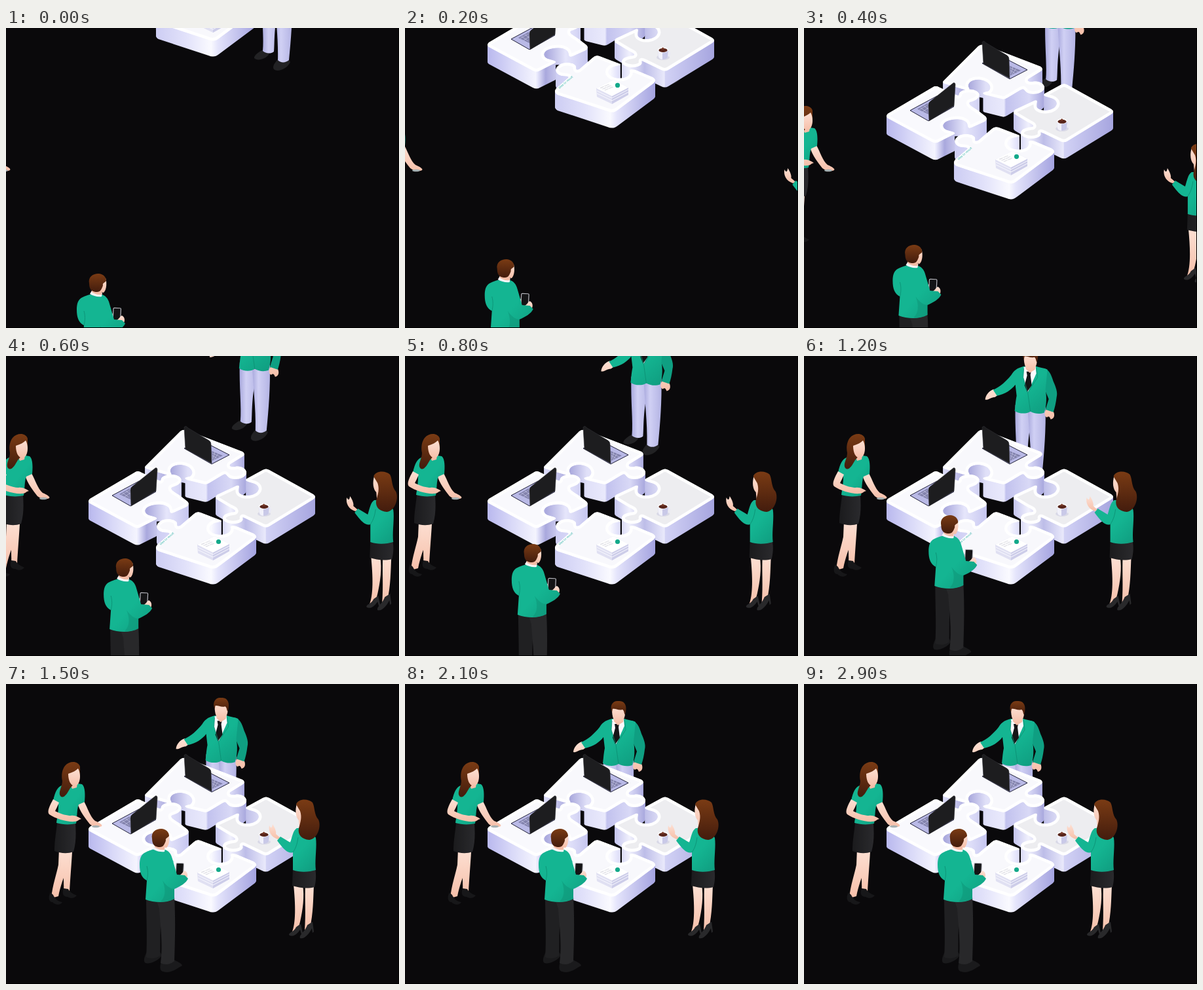
Recreate the animation shown at these times as an HTML page. Size 600x458 px, loop 3000 ms.

```html
<!DOCTYPE html>
<html lang="en">
<head>
<meta charset="utf-8">
<title>Team around a puzzle table</title>
<style>
html,body{margin:0;width:100%;height:100%;overflow:hidden;background:#0a090b}
svg{display:block;width:100vw;height:100vh}
text{font-family:"Open Sans",Arial,sans-serif}
</style>
</head>
<body>
<svg viewBox="0 0 600 458" preserveAspectRatio="none">
<defs id="defs">
<linearGradient id="green" x1="0" y1="0" x2="1" y2="1"><stop offset=".55" stop-color="#14b592"/><stop offset="1" stop-color="#0f9c7f"/></linearGradient>
<linearGradient id="skin" x1="0" y1="0" x2="0" y2="1"><stop offset="0" stop-color="#fde0d3"/><stop offset="1" stop-color="#f6bfa9"/></linearGradient>
<linearGradient id="hair" x1="0" y1="0" x2="0" y2="1"><stop offset="0" stop-color="#7a3b14"/><stop offset="1" stop-color="#431c0d"/></linearGradient>
<linearGradient id="leg"><stop offset="0" stop-color="#a9a9dd"/><stop offset=".35" stop-color="#d0d0f4"/><stop offset="1" stop-color="#b4b4e4"/></linearGradient>
<linearGradient id="cloth"><stop offset="0" stop-color="#1b1b1d"/><stop offset="1" stop-color="#2a2a2d"/></linearGradient>
</defs>
<rect width="600" height="458" fill="#0a090b"/>

<g id="host">
  <g fill="#222224">
    <path d="M305 200C298 203 290 209 291 213C295 218 309 215 314 206Z"/>
    <path d="M328 214C322 220 318 226 321 230C326 235 341 230 346 219L343 214Z"/>
  </g>
  <path fill="url(#leg)" d="M303 112H331L325 150C321 175 322 195 321 203C316 207 308 206 304 202C306 180 302 150 303 112Z"/>
  <path fill="url(#leg)" d="M322 112H349C350 150 347 185 344 216C338 221 331 220 327 216C328 180 323 150 322 112Z"/>
  <path fill="url(#skin)" d="M270 88C263 90 257 98 257 104C262 105 266 100 272 100L279 95ZM350 119C347 124 347 129 351 131C354 129 355 129 357 134C363 133 364 126 360 120Z"/>
  <path fill="#0f9f82" d="M345 56C354 56 358 66 361 76C365 85 368 93 366 100C365 109 363 117 361 123L349 119L354 103L346 84Z"/>
  <path fill="url(#green)" d="M316 53C304 56 301 60 297 66C289 76 280 84 269 89L275 98C288 95 297 89 303 81L305 98C303 108 303 115 302 121C309 126 320 126 326 122C333 126 341 126 347 124C351 112 351 100 349 88L352 58C346 55 340 55 335 53Z"/>
  <path fill="#fafafe" d="M316 54L334 53L335 64L322 93L315 70Z"/>
  <path fill="#151517" d="M320 61H327L326 66L328 82L321 92L317 82L321 67Z"/>
  <path d="M316 56L315 70L322 93L326 122M335 55L337 70L322 93" fill="none" stroke="#0c8d72" stroke-width=".8"/>
  <path fill="#f5bda7" d="M319 50H334L333 58L325 63L319 57Z"/>
  <path fill="url(#skin)" d="M316 39C316 33 334 34 336 40C337 50 333 59 326 60C319 60 316 50 316 39Z"/>
  <path fill="url(#hair)" d="M316 43C312 33 317 25 326 26C336 25 340 34 336 47C334 44 335 41 332 39C326 41 321 37 317 38Z"/>
</g>

<g id="table"></g>

<g id="left">
  <path fill="url(#skin)" d="M81 252H101C102 268 87 290 80 324L69 327C71 307 77 291 80 276ZM89 256H101C100 275 98 297 97 318L88 317C89 300 86 284 89 256Z"/>
  <path fill="#171719" d="M68 318C64 325 65 333 71 333C76 338 83 338 86 333C79 332 75 328 72 322ZM88 312C85 319 87 325 94 325C99 328 105 327 108 323C101 320 97 317 95 313Z"/>
  <path fill="url(#cloth)" d="M78 212L106 213C107 229 107 243 103 256C93 260 82 258 74 255C74 238 77 225 78 212Z"/>
  <path fill="url(#skin)" d="M109 182L119 179C125 190 128 202 136 209C143 212 148 215 146 217C140 220 133 218 128 214C121 205 113 195 109 182Z"/>
  <ellipse cx="137" cy="217.500" rx="6" ry="1.800" fill="#a7b1b3"/>
  <path fill="url(#green)" d="M85 155C79 157 75 164 72 178L80 184C80 196 78 205 77 212C87 215 98 215 107 213C109 202 108 191 111 184L120 180C121 169 121 157 116 153L103 151Z"/>
  <path fill="url(#skin)" d="M72 176L81 181C78 188 76 192 75 194C85 199 93 201 99 201C106 200 112 204 115 206C110 207 110 210 105 210C94 211 76 206 66 199C62 195 67 185 72 176Z"/>
  <path fill="#f5bea8" d="M97 150L109 151L108 158L101 160Z"/>
  <path fill="url(#hair)" d="M90 125C97 117 110 117 113 126L113 142L98 159C93 168 88 176 83 171C79 165 86 157 86 148C84 139 86 130 90 125Z"/>
  <path fill="url(#skin)" d="M95 137C102 135 107 132 110 129C115 137 114 153 106 156C98 156 95 146 95 137Z"/>
</g>

<g id="right">
  <path fill="url(#skin)" d="M439 306H453C456 325 453 345 449 363L445 378L436 381C443 365 442 337 439 306ZM457 306H470C469 330 469 350 464 373L456 376C458 350 456 330 457 306Z"/>
  <path fill="#29292b" d="M443 371L450 366L453 380L451 382L449 375C444 383 437 387 432 383C432 379 439 379 443 371ZM460 368L468 363L470 378L468 380L467 373C463 381 456 390 449 388C447 383 456 379 460 368Z"/>
  <path fill="url(#cloth)" d="M438 282H472C474 292 473 302 471 310C460 313 447 311 437 308Z"/>
  <path fill="url(#skin)" d="M415 237C405 234 400 225 402 216C404 220 406 221 407 214C411 220 413 226 412 229L419 235Z"/>
  <path fill="url(#green)" d="M444 220C438 224 437 233 434 242L419 233L414 239C422 250 430 260 438 257L438 284C449 288 463 287 473 284C471 269 475 249 473 235C469 225 458 219 444 220Z"/>
  <path d="M438 257C443 250 445 242 446 234" fill="none" stroke="#0c8d72" stroke-width=".8"/>
  <path fill="url(#skin)" d="M444 183C441 193 442 203 447 208L448 219H458V183Z"/>
  <path fill="url(#hair)" d="M443 184C445 175 461 174 468 181C472 189 470 199 477 207C482 218 475 237 463 238C452 237 445 231 447 220C450 210 452 203 449 194Z"/>
</g>

<g id="front">
  <path fill="#1a1a1c" d="M216 407C211 416 209 424 213 426C220 428 234 422 238 414L234 407ZM239 421C234 429 234 438 240 439C250 443 260 435 269 430C268 425 260 424 255 420Z"/>
  <path fill="#202022" d="M214 325H241L236 370C235 387 236 402 235 415C228 420 220 419 214 417C216 390 214 355 214 325Z"/>
  <path fill="#28282a" d="M228 325H257C259 359 258 393 257 423C250 429 242 429 236 426C240 395 235 365 234 343Z"/>
  <path fill="url(#skin)" d="M258 283C261 277 266 280 269 274L271 280C268 286 264 287 260 289Z"/>
  <rect x="259.500" y="273.500" width="11.500" height="22" rx="1.500" fill="#141416" stroke="#b9b9c0" stroke-width="1.200" transform="rotate(3 265 284)"/>
  <path fill="url(#skin)" d="M265 292C270 289 270 286 273 285C277 287 278 292 276 296L270 300Z"/>
  <path fill="url(#green)" d="M213 257C222 252 232 251 238 252C248 253 252 259 254 267L261 291L273 292L278 297C275 304 266 309 257 313L257 328C245 335 226 334 213 329L215 300C207 296 204 288 204 276C204 267 206 260 213 257Z"/>
  <path fill="#0e9679" opacity=".55" d="M239 300C245 309 252 313 257 313L257 328C250 332 242 332 236 332C244 325 244 312 239 300Z"/>
  <path d="M215 300C217 292 217 285 215 278" fill="none" stroke="#0c8d72" stroke-width=".8"/>
  <path fill="#f5f5f8" d="M224 252L227 247L243 250L242 256C236 257 229 255 224 252Z"/>
  <path fill="#f4bca6" d="M227 242H243L242 253C236 254 231 252 227 249Z"/>
  <path fill="url(#skin)" d="M239 228H248C250 233 250 246 245 250C240 250 238 244 239 228Z"/>
  <path fill="url(#hair)" d="M223 236C221 226 229 221 237 221C244 221 249 226 249 232C247 235 243 235 244 239C242 245 240 249 235 249C229 249 223 247 223 236Z"/>
</g>
<path d="M0 457.500H600M599.500 0V458" stroke="#000"/>
</svg>
<script>
const $ = id => document.getElementById(id);

// Top outline, wall height, top fill, x range and wall colours of each table piece
const pieces = [
  {
    d: 'M213 168L266 115Q271 111 278 114L361 146Q366 149 362 153L344 164C338 168 344 170 350 169C358 167 368 172 367 179C365 188 348 190 341 186C335 182 337 178 330 182L310 194Q306 197 300 195L276 189C270 186 276 185 281 184C288 180 285 168 268 166C254 165 248 173 252 179C254 183 250 184 244 181L214 172Q211 170 213 168Z',
    h: 27, top: '#f8f8fc', x: [213, 367],
    walls: [0, '#dcdcf8', .25, '#a9a8dc', .42, '#e0e0f8', .6, '#e9e9fc', .62, '#c2c2ee', .85, '#d9d9f6', 1, '#a7a6dd']
  },
  {
    d: 'M128 218L196 178Q201 174 207 178L229 188C238 192 236 190 237 187C240 180 262 178 267 187C270 193 262 198 254 200C248 203 258 208 264 212L277 222Q281 226 276 230L256 239C248 242 252 236 248 231C240 223 214 226 212 236C212 243 222 244 228 246C232 248 230 249 226 251L206 261Q201 264 195 261L128 225Q124 222 128 218Z',
    h: 26, top: '#f9f9fd', x: [126, 279],
    walls: [0, '#b9b8ee', .25, '#dadaf8', .48, '#f4f4fe', .5, '#e6e6fb', .58, '#a9a8dd', .78, '#e6e6fb', .84, '#dedef8', 1, '#c6c6f0']
  },
  {
    d: 'M322 212L352 198C360 196 352 204 356 209C362 216 384 214 386 203C386 195 376 194 370 192C364 190 366 188 370 186L392 174Q397 171 402 174L469 211Q475 215 469 219L402 260Q397 263 391 260L366 248C358 244 363 248 361 251C356 259 332 257 331 248C331 240 343 239 349 238C353 236 346 233 342 231L322 219Q318 216 322 212Z',
    h: 25, top: '#ededf0', x: [320, 472],
    walls: [0, '#c4c4ee', .15, '#f1f1fd', .3, '#bdbde8', .5, '#e9e9fb', .51, '#d2d2f5', 1, '#a6a5df']
  },
  {
    d: 'M231 288L247 274C254 269 246 270 241 269C230 268 226 258 236 252C244 247 256 249 260 253C263 256 258 262 266 259L287 241Q291 237 297 239L326 250C332 252 328 253 322 254C308 257 306 268 320 272C334 275 345 270 343 262C342 258 350 259 354 261L378 271Q385 275 380 280L325 321Q318 327 309 323L233 298Q226 294 231 288Z',
    h: 24, top: '#f8f8fc', x: [229, 382],
    walls: [0, '#cdcdf3', .3, '#e2e2fa', .55, '#fafaff', .62, '#e4e4fb', 1, '#a4a3e0']
  }
];

const laptopBack = `
  <path d="M272 141L314 165L341 151L304 132Z" fill="#b9b9e6" stroke="#23233c"/>
  <path d="M314 145L331 152L315 160Z" fill="#8282ac"/>
  <path d="M315 148L327 154M315 152L322 156M319 146L316 157M324 149L317 159" stroke="#d0d0f0" stroke-width=".6"/>
  <path d="M272 109Q274 105 278 110L310 129Q313 131 313 135L314 164L274 142Z" fill="#1d1d1f" stroke="#303035" stroke-width=".6"/>`;
const laptopLeft = `
  <path d="M162 213L190 229L229 207L203 191Z" fill="#b9b9e6" stroke="#23233c"/>
  <path d="M173 211L189 202L190 219Z" fill="#8282ac"/>
  <path d="M176 212L188 205M181 215L190 209M178 209L188 216M183 206L190 211" stroke="#d0d0f0" stroke-width=".6"/>
  <path d="M190 205Q190 201 193 199L228 171Q231 170 231 174L229 206L191 229Z" fill="#1d1d1f" stroke="#303035" stroke-width=".6"/>`;
const cup = `
  <ellipse cx="394" cy="241" rx="10" ry="4" fill="#d9d9e6"/>
  <path d="M401 232C406 231 405 239 400 239" fill="none" stroke="#e9e9f6" stroke-width="1.500"/>
  <path d="M386 229L387 240C389 245 399 245 401 240L402 229Z" fill="#c9c9e8"/>
  <path d="M386 229L387 240C388 243 391 244 393 244V230Z" fill="#f2f2fb"/>
  <ellipse cx="394" cy="229.500" rx="8" ry="4" fill="#fff"/>
  <ellipse cx="394" cy="230" rx="6.600" ry="3" fill="#57241a"/>
  <path d="M391 229Q394 222 396 229" fill="#753725"/>`;
const papers = `
  <path d="M292 288L318 275L341 287V298L316 312L293 301Z" fill="#e0e0f2"/>
  <path d="M316 300L341 287V298L316 312Z" fill="#cdcde9"/>
  <path d="M293 292L316 303L341 290M293 296L316 307L341 294" fill="none" stroke="#f8f8ff"/>
  <path d="M292 288L318 275L341 287L316 300Z" fill="#fff"/>
  <circle cx="324.500" cy="283.500" r="3.600" fill="#14a98a"/>
  <g transform="matrix(.9 -.38 .8 .45 299 288)" font-size="3" fill="#9a9aad"><text>plan notes</text><text y="4">team work</text><text y="8">next steps</text></g>
  <text transform="translate(236 289) rotate(-41)" font-size="4.500" fill="#22a6a0">idea to result</text>`;

function wallGradient(p, i) {
  let stops = '';
  for (let k = 0; k < p.walls.length; k += 2)
    stops += `<stop offset="${p.walls[k]}" stop-color="${p.walls[k + 1]}"/>`;
  return `<linearGradient id="wall${i}" gradientUnits="userSpaceOnUse" x1="${p.x[0]}" x2="${p.x[1]}" y1="0" y2="0">${stops}</linearGradient>
    <clipPath id="clip${i}"><path d="${p.d}"/></clipPath>`;
}

function block(p, i) {
  let out = '';
  for (let y = p.h; y > 0; y--)
    out += `<path d="${p.d}" fill="url(#wall${i})" transform="translate(0 ${y})"/>`;
  return out + `<path d="${p.d}" fill="${p.top}" stroke="#fff" stroke-width="9" clip-path="url(#clip${i})"/>`;
}

$('defs').insertAdjacentHTML('beforeend', pieces.map(wallGradient).join(''));
const props = [laptopBack, laptopLeft, cup, papers];
$('table').innerHTML = pieces.map((p, i) => block(p, i) + props[i]).join('');

// Each part slides in a straight line from its start offset to rest
const LOOP = 3000, STEP = 100;
const moves = [
  { el: $('table'), x: 0, y: -305, end: 560 },
  { el: $('left'), x: -140, y: 0, end: 1400 },
  { el: $('right'), x: 207, y: 0, end: 1400 },
  { el: $('front'), x: -96, y: 154, end: 1400 },
  { el: $('host'), x: 88, y: -167, end: 1545 }
];

function draw(ms) {
  const t = Math.floor(ms % LOOP / STEP) * STEP;
  for (const m of moves) {
    const k = Math.max(0, 1 - t / m.end);
    m.el.setAttribute('transform', `translate(${m.x * k} ${m.y * k})`);
  }
}

const start = performance.now();
function tick() {
  draw(performance.now() - start);
  requestAnimationFrame(tick);
}
tick();
</script>
</body>
</html>
```
